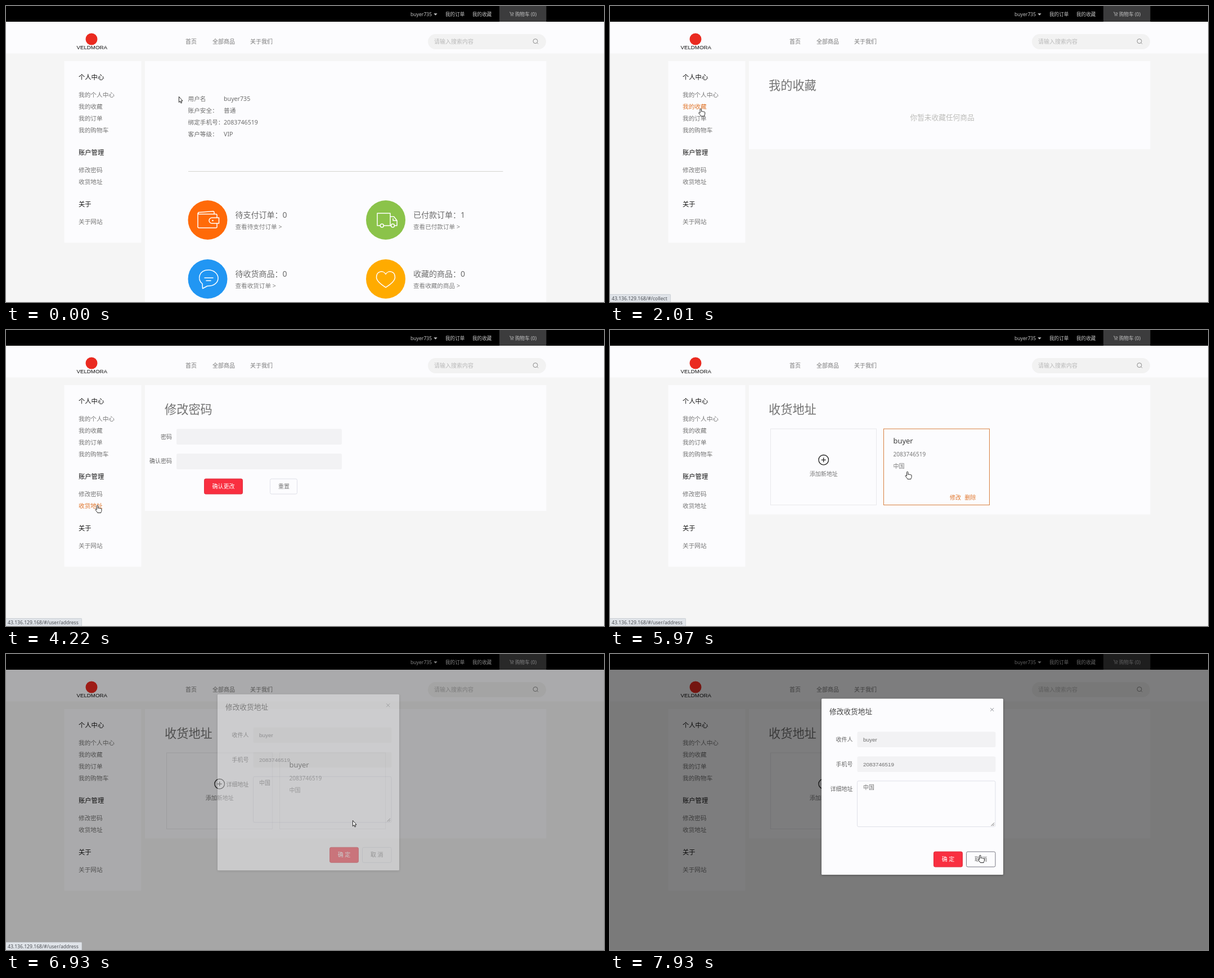
Recreate the animation shown at these times as an HTML page. Size 1063x527 px, loop 8000 ms.

```html
<!DOCTYPE html>
<html lang="zh-CN">
<head>
<meta charset="utf-8">
<title>个人中心</title>
<style>
html, body { margin: 0; width: 100%; height: 100%; overflow: hidden; background: #f5f5f5; }
svg { position: absolute; left: 0; top: 0; }
text, #status { font-family: 'Noto Sans', 'Noto Sans CJK SC', 'Noto Sans CJK', sans-serif; }
/* y of every text is its visual middle */
text { font-size: 10px; fill: #777; transform: translateY(.37em); white-space: pre; }
.top text { font-size: 8.6px; fill: #c4c4c4; }
.head { font-size: 11.3px; fill: #111; }
.nav, .body text { font-size: 10.67px; }
.body text { fill: #6c6c6c; }
.body .big { font-size: 14px; }
.body .more { font-size: 10.6px; fill: #7c7c7c; }
.title { font-size: 21.2px; fill: #737373; }
.mid { text-anchor: middle; }
.end { text-anchor: end; fill: #666; }
.field { font-family: 'Liberation Sans', 'Noto Sans CJK SC', sans-serif; font-size: 9.9px; fill: #6c6c6c; }
.panel { fill: #fcfcfe; }
.input { fill: #f2f2f4; }
.red { fill: #f92f40; stroke: #dc3140; }
.onred { fill: #fff; font-weight: 500; }
.plain { fill: #fcfcfe; stroke: #dfe0e8; }
.plain.on { stroke: #777782; }
.card { fill: none; stroke: #e8e8ec; }
.card.on { stroke: #d9803f; }
.nav.on, .link { fill: #e0762c; }
.icon { fill: none; stroke: #fff; stroke-width: 1.5; stroke-linejoin: round; stroke-linecap: round; }
#tools { visibility: hidden; }
#tools.on { visibility: visible; }
#status {
  position: absolute; left: 0; bottom: 0; height: 14px; padding: 0 5px 0 3px; box-sizing: border-box;
  font-size: 8.6px; line-height: 15px; color: #4c4f54; background: #dfe3e8; white-space: pre;
  border: solid #cdd1d6; border-width: 1px 1px 0 0; border-radius: 0 2px 0 0; line-height: 14px;
  animation: status 8s linear infinite;
}
#home { animation: home 8s step-end infinite; }
#saved { animation: saved 8s step-end infinite; }
#pass { animation: pass 8s step-end infinite; }
#address { animation: address 8s step-end infinite; }
#shade { animation: shade 8s ease infinite; }
#dialog { animation: dialog 8s ease infinite; }
#sheet { filter: drop-shadow(0 1px 2px rgba(0, 0, 0, .3)); }
@keyframes home { 0% { visibility: visible } 16.75%, 100% { visibility: hidden } }
@keyframes saved { 0% { visibility: hidden } 16.75% { visibility: visible } 40.125%, 100% { visibility: hidden } }
@keyframes pass { 0% { visibility: hidden } 40.125% { visibility: visible } 63.125%, 100% { visibility: hidden } }
@keyframes address { 0% { visibility: hidden } 63.125%, 100% { visibility: visible } }
@keyframes shade { 0%, 85.6875% { opacity: 0 } 88.1875%, 100% { opacity: .5 } }
@keyframes dialog {
  0%, 85.6875% { opacity: 0; transform: translateY(-13.2px) }
  89.4375%, 100% { opacity: 1; transform: none }
}
@keyframes status { 0%, 12.5% { opacity: 0 } 13.5%, 88.75% { opacity: 1 } 90.5%, 100% { opacity: 0 } }
</style>
</head>
<body>
<svg width="1063" height="527" viewBox="0 0 1063 527">
  <rect width="1063" height="527" fill="#f5f5f5"/>
  <rect class="panel" y="28" width="1063" height="56.5"/>
  <rect width="1063" height="28"/>
  <rect x="877" width="83.5" height="28" fill="#3c3c3d"/>
  <g class="top">
    <text x="719" y="14.5">buyer735</text>
    <path d="M760.3 13.2h6.4l-3.2 3.6z" fill="#c4c4c4"/>
    <text x="781" y="14.5">我的订单</text>
    <text x="829" y="14.5">我的收藏</text>
    <path d="M895 11h1.4l1.2 4.2h3.6l.8-3h-3.6" fill="none" stroke="#c4c4c4" stroke-width=".8"/>
    <circle cx="898" cy="17" r=".8" fill="#c4c4c4"/><circle cx="901" cy="17" r=".8" fill="#c4c4c4"/>
    <text x="905" y="14.5">购物车 (0)</text>
  </g>

  <circle cx="152" cy="59" r="10.5" fill="#ea2a20"/>
  <text class="mid" x="152.7" y="73" style="font:9.7px 'Liberation Sans',sans-serif;fill:#111">VELDMORA</text>
  <text x="319" y="63">首页</text>
  <text x="367" y="63">全部商品</text>
  <text x="434" y="63">关于我们</text>
  <rect x="750" y="50" width="210" height="27" rx="13.5" fill="#f2f2f2"/>
  <text x="761" y="63" style="fill:#b9b9b9">请输入搜索内容</text>
  <path d="M944 65.5l2 2M945 62.6a4 4 0 1 0-8 0a4 4 0 1 0 8 0" fill="none" stroke="#808080" stroke-width=".9"/>

  <rect class="panel" x="103.5" y="98" width="137" height="323.5"/>
  <text class="head" x="129" y="127">个人中心</text>
  <text class="nav" x="129" y="158.5">我的个人中心</text>
  <text class="nav" x="129" y="179.5">我的收藏</text>
  <text class="nav" x="129" y="200.5">我的订单</text>
  <text class="nav" x="129" y="221.5">我的购物车</text>
  <text class="head" x="129" y="260.5">账户管理</text>
  <text class="nav" x="129" y="292">修改密码</text>
  <text class="nav" x="129" y="313">收货地址</text>
  <text class="head" x="129" y="352.5">关于</text>
  <text class="nav" x="129" y="384">关于网站</text>

  <g id="home" class="body">
    <rect class="panel" x="247" y="98" width="713.5" height="429"/>
    <text x="323.5" y="165">用户名</text><text x="387" y="165">buyer735</text>
    <text x="323.5" y="186">账户安全：</text><text x="387" y="186">普通</text>
    <text x="323.5" y="207">绑定手机号：</text><text x="387" y="207">2083746519</text>
    <text x="323.5" y="228">客户等级：</text><text x="387" y="228">VIP</text>
    <path d="M324 294.5H883.5" stroke="#d4d4d0"/>

    <circle cx="358.5" cy="381" r="35" fill="#ff6a08"/>
    <path class="icon" d="M375 377V372.500a2 2 0 0 0-2-2H343a2 2 0 0 1-1-3L368 365.500a2 2 0 0 1 2 2V370M341 369V393a2 2 0 0 0 2 2H373a2 2 0 0 0 2-2V387M366 377H378.500V387H366a5 5 0 0 1 0-10z"/>
    <circle cx="367.500" cy="382" r="1.300" fill="#fff"/>
    <text class="big" x="407.500" y="372">待支付订单：0</text>
    <text class="more" x="407.500" y="393">查看待支付订单 &gt;</text>

    <circle cx="675" cy="381" r="35" fill="#8bc34a"/>
    <path class="icon" d="M665 391H660V369H683V391H671.500M683 375H689.500L695 382V391H690.500M683 391H684.500M688 378.500V382H694"/>
    <circle class="icon" cx="668.300" cy="391" r="3"/><circle class="icon" cx="687.500" cy="391" r="3"/>
    <text class="big" x="724" y="372">已付款订单：1</text>
    <text class="more" x="724" y="393">查看已付款订单 &gt;</text>

    <circle cx="358.500" cy="486" r="35" fill="#2196f3"/>
    <path class="icon" d="M349 494.500C339 487 343 470 360 470C370 470 377 477 377 484.500C377 493 369 499 358 498.500L349.500 503ZM353 484H368M356 489H364"/>
    <text class="big" x="407.500" y="477">待收货商品：0</text>
    <text class="more" x="407.500" y="498">查看收货订单 &gt;</text>

    <circle cx="675" cy="486" r="35" fill="#ffab00"/>
    <path class="icon" d="M675 477.500C671 470 658.500 471.500 658.500 483C658.500 490 667 496 675 501C683 496 691.500 490 691.500 483C691.500 471.500 679 470 675 477.500Z"/>
    <text class="big" x="724" y="477">收藏的商品：0</text>
    <text class="more" x="724" y="498">查看收藏的商品 &gt;</text>
  </g>

  <g id="saved">
    <rect class="panel" x="247" y="98" width="713.5" height="157"/>
    <text class="title" x="282" y="141">我的收藏</text>
    <text x="533.5" y="198.500" style="font-size:12.7px;fill:#bcbcb9">你暂未收藏任何商品</text>
  </g>

  <g id="pass">
    <rect class="panel" x="247" y="98" width="713.5" height="224"/>
    <text class="title" x="282" y="141">修改密码</text>
    <text class="end" x="295" y="190">密码</text>
    <rect class="input" x="303" y="176" width="294" height="28" rx="2.500"/>
    <text class="end" x="295" y="233.500">确认密码</text>
    <rect class="input" x="303" y="220" width="294" height="28" rx="2.500"/>
    <rect class="red" x="352.500" y="265" width="68" height="27" rx="2.500"/>
    <text class="mid onred" x="386.500" y="278">确认更改</text>
    <rect class="plain" x="469.500" y="265" width="48" height="27" rx="2.500"/>
    <text class="mid" x="494" y="278">重置</text>
  </g>

  <g id="address">
    <rect class="panel" x="247" y="98" width="713.5" height="230.500"/>
    <text class="title" x="282" y="141">收货地址</text>
    <rect class="card" x="285.500" y="176" width="188" height="135.500"/>
    <circle cx="379.700" cy="231.300" r="8.800" fill="none" stroke="#222" stroke-width="1.300"/>
    <path d="M375.700 231.300h8M379.700 227.300v8" stroke="#222" stroke-width="1.300"/>
    <text class="mid" x="379.700" y="256">添加新地址</text>
    <rect id="card" class="card" x="486.500" y="176" width="188" height="135.500"/>
    <text x="503.500" y="197" style="font-size:12.9px;fill:#3c3c3c">buyer</text>
    <text x="503.500" y="221" style="font-size:10.1px">2083746519</text>
    <text x="503.500" y="242.500">中国</text>
  </g>
  <g id="tools">
    <text class="link" x="604" y="298">修改</text>
    <text class="link" x="630.500" y="298">删除</text>
  </g>

  <rect id="shade" width="1063" height="527"/>
  <g id="dialog">
    <rect id="sheet" class="panel" x="376" y="79.500" width="323" height="313.500" rx="1.500"/>
    <text x="390" y="102" style="font-size:12.7px;fill:#444">修改收货地址</text>
    <path d="M676.200 96l6 6m0-6l-6 6" stroke="#909399" stroke-width="1"/>
    <text class="end" x="431.500" y="152.500">收件人</text>
    <rect class="input" x="439.500" y="138.500" width="246" height="27.500" rx="2.500"/>
    <text class="field" x="450" y="152.500">buyer</text>
    <text class="end" x="431.500" y="196.500">手机号</text>
    <rect class="input" x="439.500" y="182.500" width="246" height="27.500" rx="2.500"/>
    <text class="field" x="450" y="196.500">2083746519</text>
    <text class="end" x="431.500" y="240">详细地址</text>
    <rect class="plain" x="439.500" y="226" width="245.500" height="81.500" rx="2.500"/>
    <text class="field" x="450" y="237">中国</text>
    <path d="M677.500 306l5.500-5.500M680.500 306l2.500-2.500" stroke="#555" stroke-width=".9"/>
    <rect class="red" x="575.500" y="352" width="51" height="27" rx="2.500"/>
    <text class="mid onred" x="601" y="365">确 定</text>
    <rect id="cancel" class="plain" x="633.500" y="352" width="51.500" height="27" rx="2.500"/>
    <text class="mid" x="659.300" y="365">取 消</text>
  </g>

  <g id="cursor" fill="#fff" stroke="#111" stroke-width=".9" stroke-linejoin="round">
    <path id="arrow" d="M.4 .4V10.500L2.600 8.500 4 12 5.600 11.300 4.100 8H7.100Z"/>
    <path id="hand" d="M-1.200 8V1.500a1.200 1.200 0 0 1 2.400 0V5.500c.3-1 2-1 2.200.2c.4-.8 1.900-.6 2.100.4c.5-.6 1.900-.3 1.900.8V9.500c0 1.500-1 2-1.200 4H.2C-.2 11.800-2 10.500-3.600 8.200C-4.200 7.200-2.800 6.400-1.200 8Z"/>
  </g>
</svg>
<div id="status"></div>

<script>
const LOOP = 8000, FPS = 24, OPEN = 6855, EDIT_PAGE = 5050;
const $ = id => document.getElementById(id);

// pointer stops: time, x, y
const path = [
  [0, 307, 161], [90, 307, 161], [880, 163, 177], [1000, 163, 177], [1250, 160.5, 176],
  [1700, 160.5, 176], [1710, 157, 173], [1875, 157, 173], [2250, 174, 222], [2670, 159, 262],
  [2915, 155.5, 294], [3785, 155.5, 294], [3791, 157, 296], [3960, 157, 296], [4208, 162.5, 312],
  [5330, 162.5, 312], [5958, 528.5, 252], [6130, 572, 262], [6460, 616, 296],
  [7220, 616, 296], [7640, 630, 350], [7915, 658, 358], [8000, 658, 358]
];
const links = [[0, 'collect'], [2010, 'order'], [2160, 'cart'], [2820, 'user/pass'], [4090, 'user/address']];

const navs = [...document.querySelectorAll('.nav')].map(el => {
  const y = +el.getAttribute('y');
  return { el, box: [129, y - 10.5, 129 + el.textContent.length * 10.67, y + 10.5] };
});
const inside = ([x, y], [l, t, r, b]) => x >= l && x <= r && y >= t && y <= b;

const same = (a, b) => a[1] === b[1] && a[2] === b[2];
function speed(i, k) {
  const a = path[i - 1], p = path[i], b = path[i + 1];
  return !a || !b || same(a, p) || same(p, b) ? 0 : (b[k] - a[k]) / (b[0] - a[0]);
}

// cubic Hermite between stops, at rest wherever the pointer pauses
function pointer(t) {
  const i = Math.max(0, path.findIndex(p => p[0] > t) - 1);
  const a = path[i], b = path[i + 1], d = b[0] - a[0], u = (t - a[0]) / d, v = 1 - u;
  return [1, 2].map(k =>
    v * v * (1 + 2 * u) * a[k] + u * u * (3 - 2 * u) * b[k] +
    d * u * v * (v * speed(i, k) - u * speed(i + 1, k)));
}

const show = (el, on) => el.setAttribute('visibility', on ? 'visible' : 'hidden');

function draw(time) {
  const t = Math.floor((time % LOOP) * FPS / 1000 + .02) * 1000 / FPS;
  const pos = pointer(t), open = t >= OPEN, cards = !open && t >= EDIT_PAGE;
  let hot = false;
  for (const { el, box } of navs) {
    const on = !open && inside(pos, box);
    el.classList.toggle('on', on);
    hot = hot || on;
  }
  const onCard = cards && inside(pos, [486, 175, 675, 312]);
  const onAdd = cards && inside(pos, [285, 175, 474, 312]);
  const onCancel = open && inside(pos, [633, 351, 685, 379]);
  const onOk = open && inside(pos, [575, 351, 627, 379]);
  $('card').classList.toggle('on', onCard);
  $('tools').classList.toggle('on', onCard);
  $('cancel').classList.toggle('on', onCancel);
  hot = hot || onCard || onAdd || onCancel || onOk;
  show($('hand'), hot);
  show($('arrow'), !hot);
  $('cursor').setAttribute('transform', `translate(${pos[0].toFixed(2)} ${pos[1].toFixed(2)})`);
  $('status').textContent = '43.136.129.168/#/' + links.filter(l => l[0] <= t).pop()[1];
}

let start;
function tick(now) {
  start ??= now;
  draw(now - start);
  requestAnimationFrame(tick);
}
draw(0);
requestAnimationFrame(tick);
</script>
</body>
</html>
```
